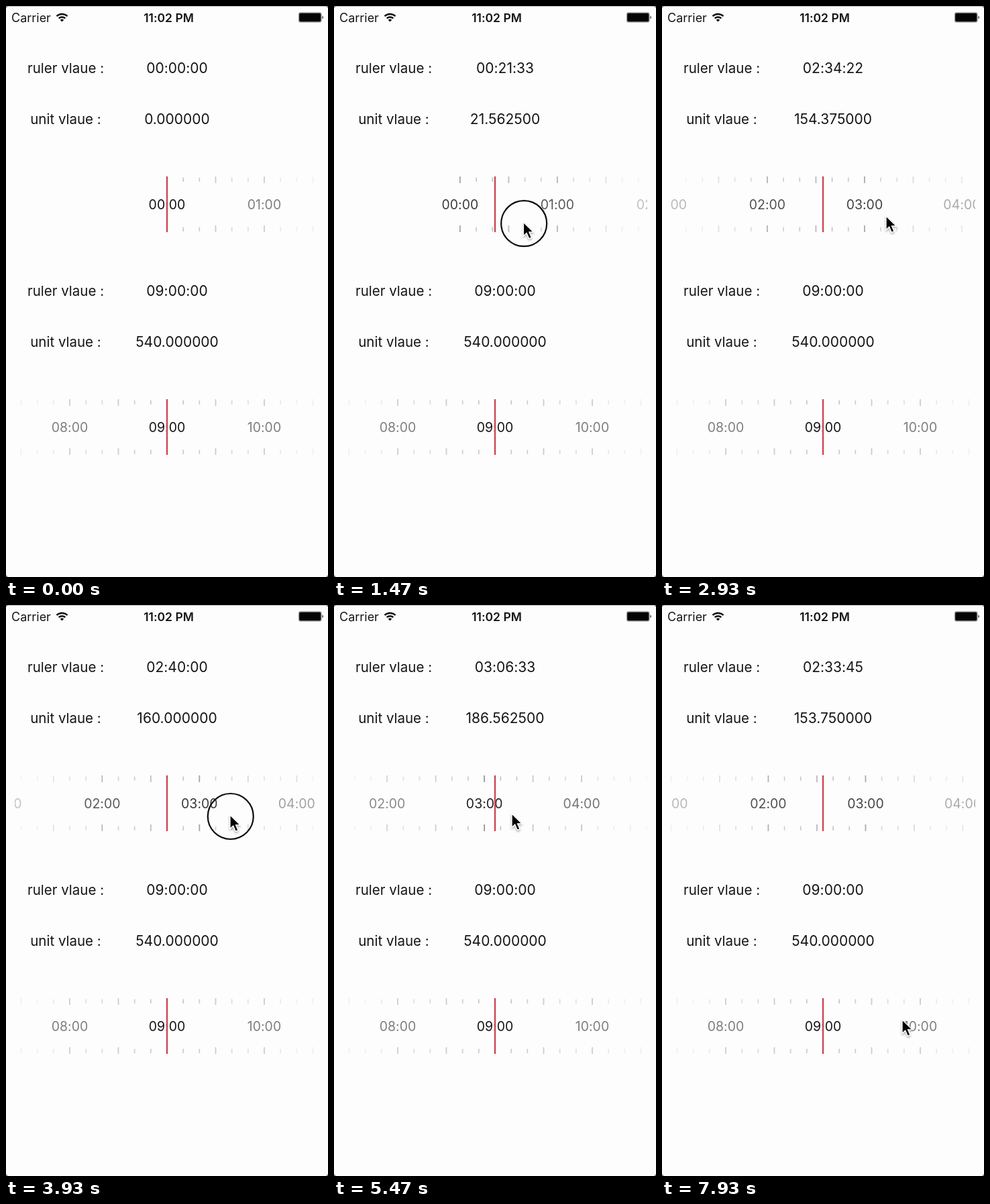
These frames come from a looping animation (480x851 px, 8 s). An HTML page:

```html
<!DOCTYPE html>
<html>
<head>
<meta charset="utf-8">
<title>Time ruler</title>
<style>
  html, body { margin: 0; width: 100%; height: 100%; overflow: hidden; background: #fefdfe; }
  svg { display: block; width: 480px; height: 851px; }
  text { font: 21px Inter, Roboto, sans-serif; font-feature-settings: "calt" 0; fill: #151515; text-anchor: middle; }
  .name { font-size: 20.5px; }
  .bar { font-size: 18px; text-anchor: start; }
  .time { font-size: 17.5px; font-weight: 600; }
  .ruler text { font-size: 19.5px; }
</style>
</head>
<body>
<svg viewBox="0 0 480 851">
  <defs>
    <clipPath id="window"><rect x="13" y="250" width="454" height="92"/></clipPath>
    <filter id="shadow" x="-50%" y="-50%" width="200%" height="200%">
      <feDropShadow dx="0" dy="2" stdDeviation="1.5" flood-opacity=".35"/>
    </filter>
  </defs>

  <path d="M0 .5H480" stroke="#b4b4b6"/>
  <path d="M0 0h3L0 3zM480 0h-3l3 3zM0 851h3l-3-3zM480 851h-3l3-3z" fill="#777"/>

  <text class="bar" x="8" y="23.5">Carrier</text>
  <g fill="none" stroke="#111" stroke-width="2.4">
    <path d="M75.5 15.2a11.5 11.5 0 0 1 16 0M78.7 18.4a7 7 0 0 1 9.6 0"/>
    <path d="M83.5 23.6l-2.7-2.9a3.9 3.9 0 0 1 5.4 0z" fill="#111" stroke="none"/>
  </g>
  <text class="time" x="242.5" y="23.5">11:02 PM</text>
  <rect x="436.5" y="10" width="33.5" height="14" rx="2.5" fill="#050505" stroke="#a4a4a4" stroke-width="1.4"/>
  <path d="M471.5 14.5q3 2.5 0 5z" fill="#333"/>

  <g id="panels"></g>

  <circle id="touch" r="34" fill="none" stroke="#0c0c0c" stroke-width="2.2"/>
  <path id="cursor" d="M0 0V20.5L4.7 16.2L8.3 24.4L12 22.8L8.5 14.8H15Z"
        fill="#050505" stroke="#fff" stroke-width="1.3" filter="url(#shadow)"/>
</svg>

<script>
const $ = id => document.getElementById(id);
const LOOP = 8000, CENTER = 240, TICK = 145 / 6, STEP = 0.3125;

const smooth = p => p * p * (3 - 2 * p);
const flick = p => p ** 2.382;
const glide = p => (1 - Math.exp(-3.4 * p)) / (1 - Math.exp(-3.4));

// Begin, end, what to reach, easing; everything rests between moves
const moves = [
  [30, 800, { x: 334, y: 327 }],
  [1150, 1580, { minutes: 44.6875, x: 227, y: 317 }, flick],
  [1580, 3400, { minutes: 160 }, glide],
  [2270, 2870, { x: 334, y: 313 }],
  [4010, 4670, { minutes: 186.5625, x: 265, y: 311 }],
  [5480, 5670, { x: 280, y: 310 }],
  [5670, 6330, { minutes: 157.5, x: 350 }],
  [6410, 6530, { minutes: 153.75, x: 359 }],
  [7200, 7600, { x: 354, y: 734 }],
  [7600, 7930, { x: 358, y: 618 }]
];
const presses = [[930, 1580], [3860, 4860], [5600, 6860]];

function stateAt(t) {
  const s = { minutes: 0, x: 350, y: 762 };
  for (const [begin, end, goal, ease = smooth] of moves) {
    if (t <= begin) break;
    const p = ease(Math.min(1, (t - begin) / (end - begin)));
    for (const key in goal) s[key] += (goal[key] - s[key]) * p;
  }
  return s;
}

const two = n => String(Math.floor(n)).padStart(2, '0');
const clock = m => [m / 60, m % 60, m * 60 % 60].map(two).join(':');

function ruler(value) {
  const pos = value / 10;
  let out = '';
  for (let i = Math.max(0, Math.ceil(pos - 11)); i <= pos + 11; i++) {
    const x = CENTER + (i - pos) * TICK, far = Math.abs(x - CENTER);
    const hour = i % 6 === 0, long = i % 3 === 0;
    const path = long ? 'M0 254v10M0 327v10' : 'M0 255.5v6.5M0 329.5v6.5';
    const color = hour ? '#909094' : long ? '#b8b8bc' : '#c6c6ca';
    out += `<g transform="translate(${x})">
      <path d="${path}" stroke="${color}" stroke-width="1.8" opacity="${Math.max(0, 1 - far / 260)}"/>
      ${hour ? `<text y="303" opacity="${Math.max(0, 1 - far / 320)}">${two(i / 6)}:00</text>` : ''}</g>`;
  }
  return out;
}

const panel = (value, y) => `<g transform="translate(0 ${y})">
  <text class="name" x="89" y="100">ruler vlaue :</text>
  <text x="255" y="100">${clock(value)}</text>
  <text class="name" x="89" y="175.5">unit vlaue :</text>
  <text x="255" y="175.5">${value.toFixed(6)}</text>
  <g class="ruler" clip-path="url(#window)">${ruler(value)}</g>
  <path d="M240 254V337" stroke="#cb4a57" stroke-width="2.5"/></g>`;

function place(id, x, y, visible) {
  $(id).setAttribute('transform', `translate(${x} ${y})`);
  $(id).style.display = visible ? '' : 'none';
}

function draw(now) {
  // The picture advances at 15 steps per second
  const t = Math.floor((now % LOOP) * 0.015 + 0.08) / 0.015;
  const { minutes, x, y } = stateAt(t);
  const value = Math.round(minutes / STEP) * STEP;
  $('panels').innerHTML = panel(value, 0) + panel(540, 332);
  place('cursor', x, y, t > 60);
  place('touch', x + 0.8, y + 2, presses.some(([a, b]) => t >= a && t < b));
}

const start = performance.now();
function frame() {
  draw(performance.now() - start);
  requestAnimationFrame(frame);
}
frame();
</script>
</body>
</html>
```
